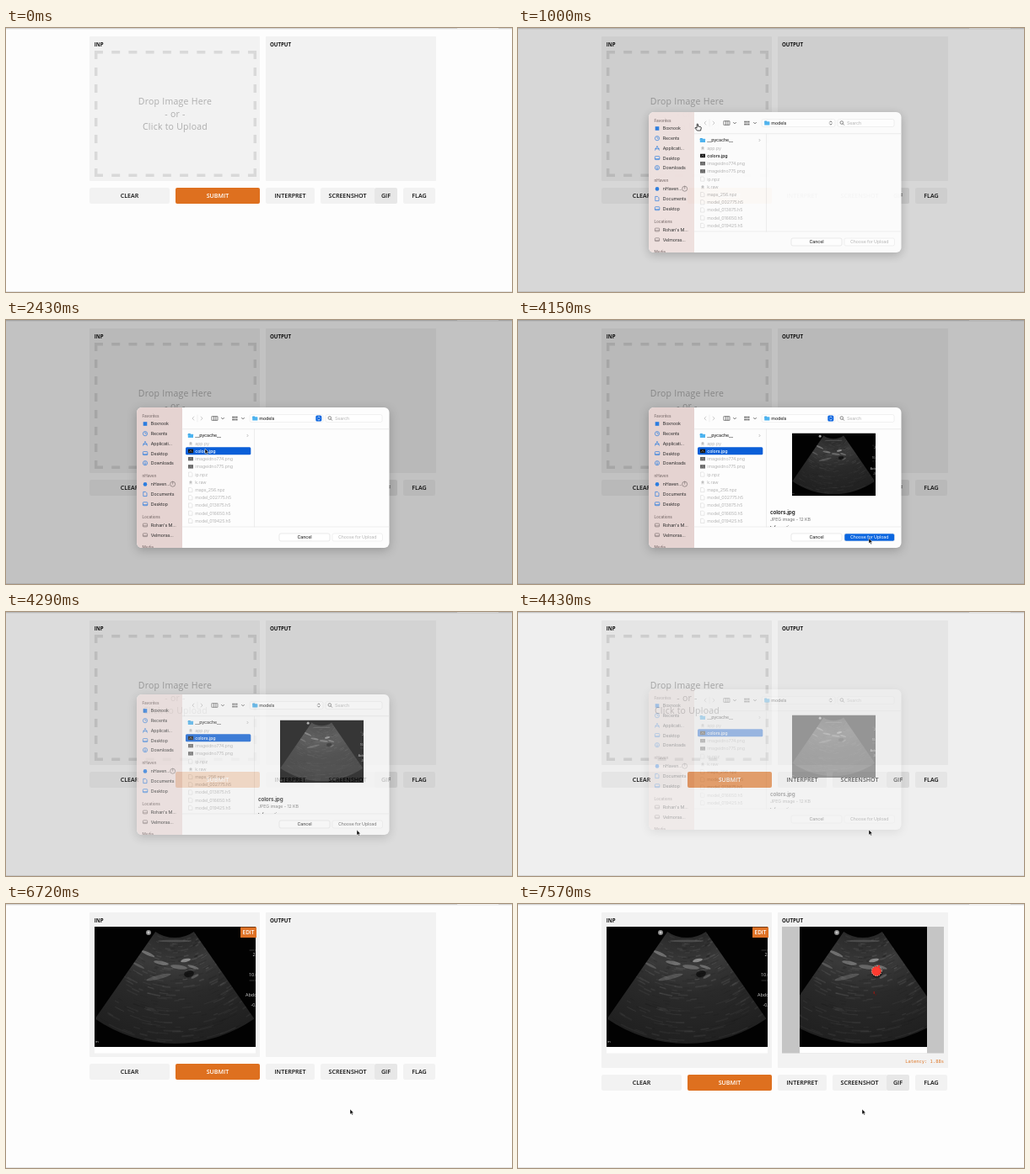
These frames come from a looping animation (600x314 px, 8 s). An HTML page:

```html
<!DOCTYPE html>
<html lang="en">
<head>
<meta charset="utf-8">
<title>Image upload demo</title>
<style>
  html, body { margin: 0; width: 100%; height: 100%; overflow: hidden; background: #fdfdfd; }
  #stage { position: fixed; left: 0; top: 0; display: block; }
  text { white-space: pre; }
  .page { font-family: "Open Sans", sans-serif; font-weight: 600; fill: #111; }
  .label { font-size: 6.1px; font-weight: 700; }
  .button { font-size: 7.1px; text-anchor: middle; }
  .drop { font-size: 10.5px; font-weight: 400; letter-spacing: .25px; text-anchor: middle; fill: #adadad; }
  .ui { font-family: Inter, sans-serif; font-size: 5.3px; letter-spacing: -.1px; fill: #2b2b2b; }
  .head { font-size: 4.7px; font-weight: 600; fill: #8d7f7e; }
  .off { fill: #b4b4b4; }
  .line { fill: none; stroke-linecap: round; stroke-linejoin: round; }
  .mid { text-anchor: middle; }
  #dialog { filter: drop-shadow(0 3px 6px rgba(0,0,0,.22)); }
</style>
</head>
<body>
<svg id="stage" width="600" height="314" viewBox="0 0 600 314"></svg>
<script>
const FPS = 7, LOOP = 8000;
const stage = document.getElementById('stage');

const rect = (x, y, w, h, fill, more = '') =>
  `<rect x="${x}" y="${y}" width="${w}" height="${h}" fill="${fill}" ${more}/>`;
const text = (x, y, s, cls, more = '') =>
  `<text x="${x}" y="${y}" class="${cls}" ${more}>${s}</text>`;
const line = (d, color, width = .7, more = '') =>
  `<path d="${d}" class="line" stroke="${color}" stroke-width="${width}" ${more}/>`;
const dot = (x, y, r, fill, more = '') =>
  `<circle cx="${x}" cy="${y}" r="${r}" fill="${fill}" ${more}/>`;
const group = (id, body, more = '') => `<g id="${id}" ${more}>${body}</g>`;

let seed = 11;
const rand = () => (seed = (seed * 16807) % 2147483647) / 2147483647;

// Fan-shaped scan, measured from its apex
const apex = { x: 200, y: 0 }, inner = 40, outer = 166, half = .605;
const polar = (r, a) =>
  `${(apex.x + r * Math.sin(a)).toFixed(1)} ${(apex.y + r * Math.cos(a)).toFixed(1)}`;
const fan = `M${polar(inner, -half)}L${polar(outer, -half)}A${outer} ${outer} 0 0 0 ${polar(outer, half)}` +
  `L${polar(inner, half)}A${inner} ${inner} 0 0 1 ${polar(inner, -half)}Z`;

function streaks() {
  let out = '';
  for (let i = 0; i < 300; i++) {
    const r = inner + 2 + rand() * (outer - inner - 2);
    const a = (rand() * 2 - 1) * half;
    const len = .03 + rand() * .11;
    const glow = Math.exp(-(((r - 78) / 26) ** 2));
    const shade = rand() < .4 ? '#000' : '#bbb';
    const alpha = (.05 + glow * .1 * rand() + .04 * rand()).toFixed(2);
    out += line(`M${polar(r, a)}A${r} ${r} 0 0 0 ${polar(r, a + len)}`, shade, (.7 + rand() * 1.3).toFixed(1),
      `opacity="${alpha}"`);
  }
  return out;
}

function blob(x, y, rx, ry, turn, fill, alpha) {
  return `<ellipse cx="${x}" cy="${y}" rx="${rx}" ry="${ry}" fill="${fill}" opacity="${alpha}"
    transform="rotate(${turn} ${x} ${y})"/>`;
}

const scan = rect(105, 27, 191, 143, '#020202') +
  `<path d="${fan}" fill="url(#tone)"/>` +
  `<g clip-path="url(#fan)" filter="url(#soft)">` + streaks() +
  blob(168, 59, 9, 1.8, 24, '#ccc', .38) + blob(184, 70, 9, 2.2, 12, '#ccc', .35) +
  blob(213, 67, 6, 2, -12, '#ddd', .5) + blob(205, 75, 10, 2.4, 8, '#ccc', .3) +
  blob(181, 87, 15, 2.4, -14, '#bbb', .25) + blob(222, 75, 7, 1.6, 18, '#ccc', .35) +
  blob(217, 83, 6, 4, -15, '#000', .6) + blob(224, 86, 5, 1.5, -28, '#bbb', .3) +
  blob(157, 73, 8, 1.5, 28, '#bbb', .25) + blob(200, 44, 20, 1.4, 0, '#ccc', .2) + '</g>' +
  dot(169, 34, 3, '#8a8a8a') + dot(169, 34, 1.4, '#c8c8c8') +
  `<g font-family="Open Sans, sans-serif" font-size="5.4" fill="#d5d5d5">` +
  text(292.5, 62, '2', '') + text(288, 86, '10.0', '') + text(284, 110, 'Abdomen', '') +
  text(290.5, 122, '-0.', '') + text(106, 165, 'm', '', 'font-size="4"') + '</g>' +
  line('M289 55H296M289 91H296', '#555', .6);

const picture = (x, y, w, h, box) =>
  `<svg x="${x}" y="${y}" width="${w}" height="${h}" viewBox="${box}" preserveAspectRatio="none"><use href="#scan"/></svg>`;

const defs = `<defs>
  <radialGradient id="tone" gradientUnits="userSpaceOnUse" cx="200" cy="0" r="166">
    <stop offset=".24" stop-color="#292929"/><stop offset=".45" stop-color="#3a3a3a"/>
    <stop offset=".65" stop-color="#2a2a2a"/><stop offset="1" stop-color="#202020"/>
  </radialGradient>
  <filter id="soft"><feGaussianBlur stdDeviation=".7"/></filter>
  <clipPath id="fan"><path d="${fan}"/></clipPath>
  <clipPath id="sheet"><rect x="155" y="104" width="299.5" height="167" rx="6"/></clipPath>
  <clipPath id="info"><rect x="295" y="130" width="160" height="116"/></clipPath>
  ${group('scan', scan)}</defs>`;

// Web page
const button = (x, w, s, fill = '#f2f2f2', more = '') =>
  rect(x, 190, w, 19, fill, 'rx="2" ' + more) + text(x + w / 2, 202.1, s, 'page button');

const dropZone = line('M105 28.7H297M105 175.3H297', '#d9d9d9', 3.5,
    'stroke-dasharray="10 10.22" style="stroke-linecap:butt"') +
  line('M106.7 27V177M295.3 27V177', '#d9d9d9', 3.5, 'stroke-dasharray="10 10" style="stroke-linecap:butt"') +
  ['Drop Image Here', '- or -', 'Click to Upload']
    .map((s, i) => text(200.5, 90.6 + 15.1 * i, s, 'page drop')).join('');

const upload = rect(105, 170, 191, 7.5, '#fff') + picture(105, 27, 191, 143, '105 27 191 143') +
  rect(278, 27.5, 19, 12.5, '#df7226') +
  text(287.5, 36.2, 'EDIT', 'page mid', 'font-size="6.4" style="fill:#fff"');

const result = rect(313, 27, 192, 150.5, '#c5c5c5') + rect(334, 170, 151, 7.5, '#fff') +
  picture(334, 27, 151, 143, '125 27 151 143') +
  dot(425, 80, 5.7, '#ff3b30') +
  dot(425.3, 79.6, 6, 'none', 'stroke="#e8cfc0" stroke-width="1" stroke-dasharray="1.2 1.3"') +
  dot(428, 74, 1.3, '#e33') + rect(421.5, 104, 1.5, 3, '#7d1c18') + rect(423.5, 107, 1, 2, '#5c1613') +
  text(505, 189.3, 'Latency: 1.88s', '',
    'text-anchor="end" font-family="DejaVu Sans Mono, monospace" font-size="5.45" fill="#df7a2c"');

const panel = x => rect(x, 10, 202, 172, '#f2f2f2', 'class="panel" rx="1"');
const page = rect(0, 0, 600, 314, '#fdfdfd') +
  rect(0, 0, 600, 1.3, '#d3d3d3') + rect(535, 0, 49, 1.3, '#ececec') + rect(0, 313, 600, 1, '#e4e4e4') +
  panel(99) + panel(308) +
  text(104.8, 21.5, 'INP', 'page label') + text(313, 21.5, 'OUTPUT', 'page label') +
  group('drop', dropZone) + group('upload', upload) + group('result', result) +
  group('buttons', button(99, 95, 'CLEAR') +
    rect(201, 190, 100, 19, '#de701f', 'rx="2" id="submit"') +
    text(251, 202.1, 'SUBMIT', 'page button', 'style="fill:#fff"') +
    button(308, 58, 'INTERPRET') + button(373, 64, 'SCREENSHOT') + rect(434, 190, 3, 19, '#f2f2f2') +
    button(437, 27, 'GIF', '#e7e7e7') + button(471, 38, 'FLAG'));

// File dialog
const blue = '#2b7de0', grey = '#857877';
const icons = {
  square: y => rect(162.7, y - 2.3, 4.6, 4.6, blue),
  clock: y => dot(165, y, 2.6, 'none', `stroke="${blue}" stroke-width=".7"`) + line(`M165 ${y - 1.5}V${y}H166.3`, blue, .6),
  apps: y => line(`M162.6 ${y + 2.4}L165 ${y - 2.6}L167.4 ${y + 2.4}M162.6 ${y + .8}H167.4`, blue),
  desk: y => rect(162.4, y - 2, 5.4, 4, 'none', `rx=".7" stroke="${blue}" stroke-width=".7"`) + line(`M162.6 ${y + 1}H167.6`, blue),
  down: y => dot(165, y, 2.6, 'none', `stroke="${blue}" stroke-width=".7"`) +
    line(`M165 ${y - 1.4}V${y + 1.4}M164 ${y + .4}L165 ${y + 1.4}L166 ${y + .4}`, blue, .6),
  round: y => dot(165, y, 2.3, blue),
  doc: y => line(`M163.2 ${y - 2.6}H165.6L167 ${y - 1.2}V${y + 2.6}H163.2Z`, blue),
  disk: y => rect(162.4, y - 1.9, 5.2, 3.8, 'none', `rx=".7" stroke="${grey}" stroke-width=".7"`) + line(`M162.6 ${y + .7}H167.4`, grey, .6)
};
const places = [
  ['Favorites', 114], ['Boxnook', 123.5, 'square'], ['Recents', 135.2, 'clock'], ['Applicati...', 146.9, 'apps'],
  ['Desktop', 158.6, 'desk'], ['Downloads', 170.2, 'down'],
  ['nHaven', 185.5], ['nHaven...', 195.4, 'round'], ['Documents', 207, 'doc'], ['Desktop', 218.7, 'desk'],
  ['Locations', 234], ["Rohan's M...", 244, 'disk'], ['Velmoras...', 255.7, 'disk'], ['Media', 270.5]
];
const sidebar = places.map(([s, y, icon]) => icon
  ? icons[icon](y) + text(171.8, y + 1.9, s, 'ui')
  : text(161.5, y + 1.7, s, 'ui head')).join('') +
  dot(197.7, 195.2, 3, 'none', 'stroke="#706665" stroke-width=".6"') + line('M197.7 192.2V195.2', '#706665', .6);

const folder = (x, y) => rect(x, y - 2.5, 3, 2, '#39a0e0', 'rx=".5"') + rect(x, y - 1.8, 6.2, 4.4, '#4db4f0', 'rx=".6"');
const files = ['__pycache__', 'app.py', 'colors.jpg', 'imageidno774.png', 'imageidno775.png', 'ip.npz', 'k.raw',
  'maps_256.npz', 'model_002775.h5', 'model_013875.h5', 'model_016650.h5', 'model_019425.h5'];
const thumb = (y, fill) => rect(216, y - 2.2, 6, 4.4, fill) + line(`M217.5 ${y + 1}L219 ${y - 1}L220.5 ${y + 1}`, '#999', .6);
function fileIcon(s, y) {
  if (s[0] === '_') return folder(215.8, y);
  if (s === 'colors.jpg') return thumb(y, '#111');
  if (s.endsWith('png')) return thumb(y, '#666');
  if (s.length < 7 && !s.endsWith('npz')) return dot(219, y, 1.6, '#c2c2c2') + line(`M217.4 ${y + 2}H220.6`, '#ccc', .6);
  return line(`M217 ${y - 2.6}H219.6L221 ${y - 1.2}V${y + 2.6}H217Z`, '#d0d0d0', .5);
}
const rowY = i => 137.5 + 9.22 * i;
const list = files.map((s, i) => {
  const on = i === 0 || i === 2;
  return fileIcon(s, rowY(i)) +
    text(224.3, rowY(i) + 1.9, s, 'ui' + (on ? '' : ' off'), (i === 2 ? 'id="pick" ' : '') + (on ? 'font-weight="500"' : ''));
}).join('') + line('M286 136.3L287 137.5L286 138.7', '#999', .6);

const chevron = x => line(`M${x - 1.4} 116.4L${x} 117.8L${x + 1.4} 116.4`, '#444', .8);
const toolbar = line('M222.8 115L221 117L222.8 119M231.2 115L233 117L231.2 119', '#b5b5b5') +
  line('M227 113V121', '#e3e3e3', .5) +
  line('M244.3 114.7H251V119.3H244.3ZM246.5 114.7V119.3M248.8 114.7V119.3', '#555') + chevron(257) +
  [0, 1, 2].map(i => rect(268.4 + 2.2 * i, 114.7, 1.6, 1.8, '#555') + rect(268.4 + 2.2 * i, 117.6, 1.6, 1.8, '#555')).join('') +
  chevron(281) +
  rect(289, 112.5, 87, 9, '#fff', 'rx="2" stroke="#e2e2e2" stroke-width=".5"') + folder(292.2, 117) +
  text(300.3, 118.9, 'models', 'ui', 'font-weight="500"') +
  rect(367.3, 113.5, 7, 7, '#0b66e0', 'rx="1.6" id="knob"') +
  line('M369.6 116.1L370.8 114.8L372 116.1M369.6 117.9L370.8 119.2L372 117.9', '#fff', .7, 'id="ticks"') +
  rect(379, 112.5, 67, 9, '#fff', 'rx="2" stroke="#e2e2e2" stroke-width=".5"') +
  dot(383.8, 116.5, 1.8, 'none', 'stroke="#555" stroke-width=".7"') + line('M385.2 117.9L386.6 119.3', '#555') +
  text(390, 118.9, 'Search', 'ui off');

const preview = picture(325, 134.5, 99, 74.7, '105 27 191 143') +
  text(299, 231, 'colors.jpg', 'ui', 'font-weight="700" style="font-size:6.2px"') +
  text(299, 239.3, 'JPEG image - 12 KB', 'ui', 'style="fill:#777"') +
  text(299, 249, 'Information', 'ui', 'font-weight="600"');

const dialog = rect(155, 104, 299.5, 167, '#fdfdfd', 'rx="6"') +
  `<g clip-path="url(#sheet)">` + rect(155, 104, 54, 167, '#e5d3d1', 'id="side"') + sidebar +
  line('M209 129.7H455M209 246H455M294.5 130V246', '#e3e3e3', .6) + toolbar +
  rect(213, 151.3, 77.3, 9, '#0b5fd8', 'rx="1.5" id="mark"') + list +
  group('preview', preview, 'clip-path="url(#info)"') +
  rect(324, 254, 60, 9, '#fff', 'rx="2" stroke="#dcdcdc" stroke-width=".6"') +
  text(354, 260.4, 'Cancel', 'ui mid', 'font-weight="500"') +
  rect(387, 254, 59.5, 9, '#fff', 'rx="2" stroke="#e8e8e8" stroke-width=".6" id="choose"') +
  text(416.7, 260.4, 'Choose for Upload', 'ui mid', 'id="chooseText"') + '</g>';

const pointers = group('arrow', '<path d="M0 0V6.2L1.4 4.9L2.4 7L3.4 6.5L2.5 4.5H4.3Z" fill="#000" stroke="#fff" stroke-width=".5"/>') +
  group('hand', '<path d="M-.9 .8Q-.9 0 -.2 0Q.5 0 .5 .8V3L3.6 3.6Q4.4 3.9 4.2 5L3.6 8H-.6L-3 5.2Q-3.2 4.2 -2 4.4L-.9 5.2Z" fill="#fff" stroke="#111" stroke-width=".8" stroke-linejoin="round"/>');

stage.innerHTML = defs + page + rect(0, 0, 600, 314, '#000', 'id="dim"') + group('dialog', dialog) + pointers;

// Tables are [step, ...values]; between rows the values run linearly
const path = [[0, 213, 114], [7, 213, 114], [14, 236, 151], [15, 236, 153], [20, 236, 153], [23, 300, 194], [27, 415, 258],
  [28, 416, 260], [31, 416, 259], [35, 288, 172], [37, 263, 192], [38, 255.5, 197.5], [40, 255.5, 197.5],
  [43, 320, 226], [47, 408, 244]];
const sheet = [[6, -12, 0, 0], [7, -4, .97, .15], [8, -1, 1, .21], [9, 0, 1, .235], [29, 0, 1, .235],
  [30, -6, .75, .13], [31, -12, .35, .053], [32, -14, 0, 0]];

function at(table, k) {
  const i = table.findIndex(row => row[0] > k);
  if (i < 0) return table[table.length - 1].slice(1);
  if (i === 0) return table[0].slice(1);
  const a = table[i - 1], b = table[i], p = (k - a[0]) / (b[0] - a[0]);
  return a.slice(1).map((v, j) => v + (b[j + 1] - v) * p);
}

const $ = id => document.getElementById(id);
const set = (id, name, value) => $(id).setAttribute(name, value);
const show = (id, on) => { $(id).style.display = on ? '' : 'none'; };

function draw(k) {
  const [x, y] = at(path, k), [shift, alpha, dim] = at(sheet, k);
  const done = k >= 53, loaded = k >= 34, picked = k >= 17;
  const active = k >= 8 && k < 30, ready = k >= 18 && active;
  const hover = k > 35 && x > 201 && x < 301 && y > 190 && y < 209;
  const hand = k <= 7 || hover;

  show('drop', !loaded);
  show('upload', loaded);
  show('result', done);
  set('buttons', 'transform', `translate(0 ${done ? 13 : 0})`);
  document.querySelectorAll('.panel').forEach(p => p.setAttribute('height', done ? 185 : 172));
  set('submit', 'fill', hover ? '#ee920f' : '#de701f');

  set('dim', 'opacity', dim);
  show('dialog', alpha > 0);
  set('dialog', 'opacity', alpha);
  set('dialog', 'transform', `translate(0 ${shift})`);
  set('side', 'fill', active ? '#e5d3d1' : '#efe1df');
  set('knob', 'fill', active ? '#0b66e0' : '#fff');
  set('ticks', 'stroke', active ? '#fff' : '#333');
  show('mark', picked);
  show('preview', k >= 18);
  $('pick').style.fill = picked ? '#fff' : '#111';
  set('choose', 'fill', ready ? '#0b66e0' : '#fff');
  $('chooseText').style.fill = ready ? '#fff' : k >= 30 ? '#555' : '#b4b4b4';

  show('arrow', !hand);
  show('hand', hand && k > 0);
  set(hand ? 'hand' : 'arrow', 'transform', `translate(${x} ${y})`);
}

let last = -1;
const start = performance.now();
function tick() {
  const t = (performance.now() - start) % LOOP;
  const k = Math.floor(t * FPS / 1000 + .02);
  if (k !== last) draw(last = k);
  requestAnimationFrame(tick);
}
tick();
</script>
</body>
</html>
```
